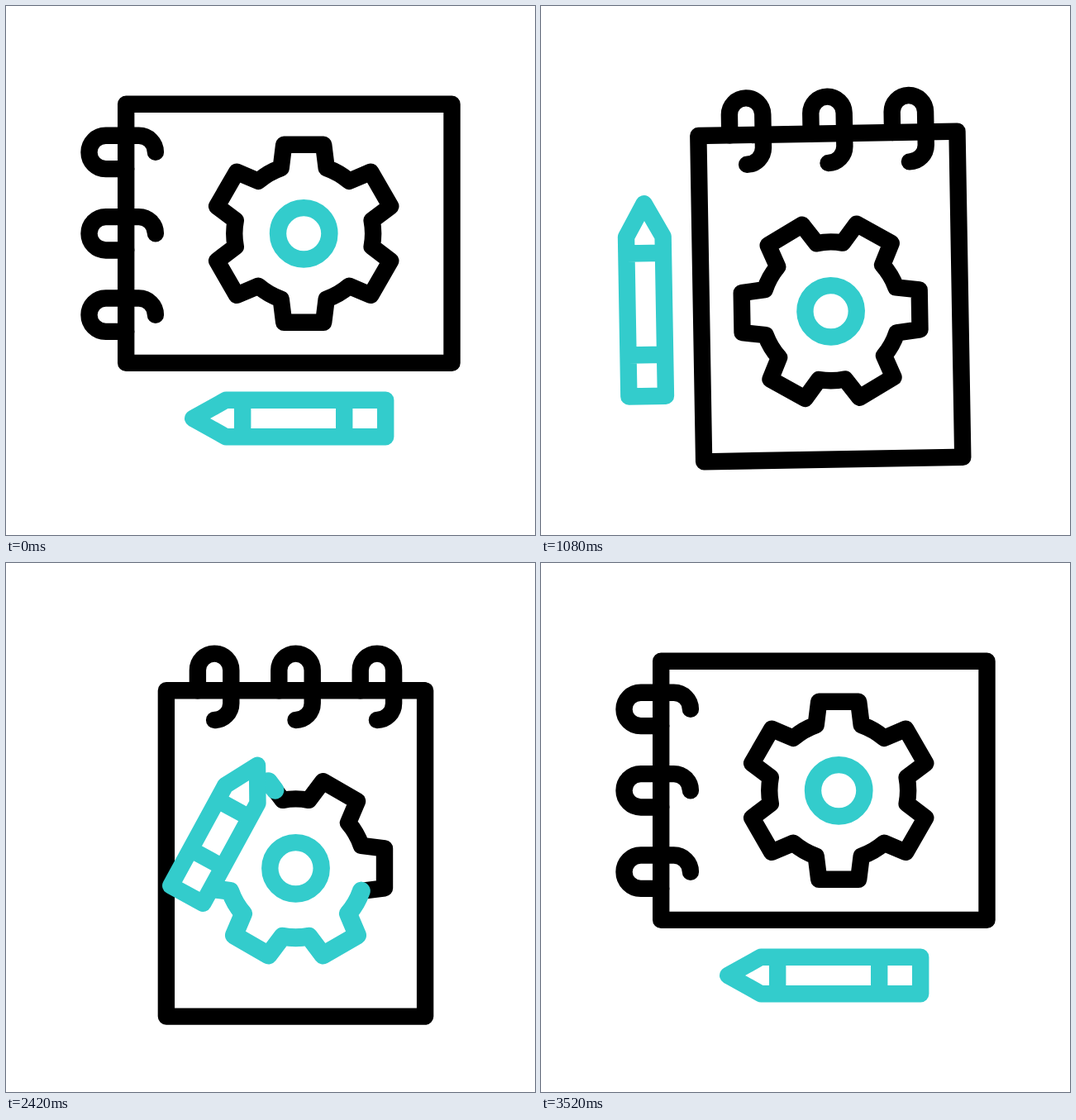
An HTML page that plays this animation: 640 px wide and 640 px high, repeating every 3580 ms.

```html
<!DOCTYPE html>
<html lang="en">
<head>
<meta charset="utf-8">
<title>Sketchbook</title>
<style>
  html, body { margin: 0; height: 100%; overflow: hidden; background: #fff; }
  svg { display: block; width: 100vw; height: 100vh; }
  path, circle { fill: none; stroke: #000; stroke-width: 20.4; stroke-linecap: round; stroke-linejoin: round; }
  .accent { stroke: #3cc; }
  #trail { stroke-width: 22; }
  #pen { fill: #fff; }
</style>
</head>
<body>
<svg viewBox="0 0 640 640">
  <path id="swoosh" class="accent"/>
  <g id="book">
    <path d="M-215-156.6H179.3V156.6H-215Z"/>
    <path id="rings"/>
    <path id="gear"/>
    <circle class="accent" r="31.2"/>
    <path id="trail" class="accent"/>
    <path id="pen" class="accent"/>
  </g>
</svg>
<script>
const LOOP = 3580, REST = 3520;
const [swoosh, book, rings, gear, trail, pen] =
  ['swoosh', 'book', 'rings', 'gear', 'trail', 'pen'].map(id => document.getElementById(id));

const rad = deg => deg * Math.PI / 180;
const clamp = x => Math.min(1, Math.max(0, x));
const linear = (t, from, to) => clamp((t - from) / (to - from));
const ease = (t, from, to) => {
  const x = linear(t, from, to);
  return x * x * (3 - 2 * x);
};

const turn = (x, y, deg) => {
  const c = Math.cos(rad(deg)), s = Math.sin(rad(deg));
  return `${x * c - y * s} ${x * s + y * c}`;
};

function gearPath() {
  let d = 'M' + turn(27.5, -79.3, 0);
  for (let a = 60; a <= 360; a += 60) {
    d += 'A84 84 0 0 1 ' + turn(-27.5, -79.3, a);
    for (const [x, y] of [[-24, -107.5], [24, -107.5], [27.5, -79.3]]) d += 'L' + turn(x, y, a);
  }
  return d;
}

const outline = gearPath();
gear.setAttribute('d', outline);
trail.setAttribute('d', outline);
const length = gear.getTotalLength();

rings.setAttribute('d', [-98.4, 0, 98.4].map(y =>
  `M-215 ${y + 20.2}h-24.5a20.2 20.2 0 0 1 0-40.4h40a20.2 20.2 0 0 1 20.2 20.2`).join(''));

function drawBook(t) {
  const r = ease(t, 565, 1115) - ease(t, 2895, 3555);
  const x = 360.2 - 9.7 * r;
  const y = 275.3 - 43 * ease(t, 215, 571) + 137 * ease(t, 571, 996) - 94 * ease(t, 2880, 3540);
  book.setAttribute('transform', `translate(${x} ${y}) rotate(${90 * r})`);
}

function drawTrail(t) {
  const start = ease(t, 3020, 3520) * length;
  const size = linear(t, 1430, 2960) * length - start;
  trail.style.display = size > 0.5 ? '' : 'none';
  trail.setAttribute('stroke-dasharray', `0 ${start} ${size} ${2 * length}`);
}

function drawPen(t) {
  const use = ease(t, 1100, 1430) - ease(t, 3038, 3520);
  const p = gear.getPointAtLength(linear(t, 1422, 3090) * length);
  const x = -134 + (p.x - 33 + 134) * use;
  const y = 223.7 + (p.y - 10 - 223.7) * use;
  const cut = 55 * use;
  pen.setAttribute('d', `M0 0L40-22.3H${233 - cut}V22.3H40ZM60-22.3V22.3M${183 - cut}-22.3V22.3`);
  pen.setAttribute('transform', `translate(${x} ${y}) rotate(${28.6 * use})`);
}

function drawSwoosh(t) {
  const [cx, cy, first, sweep, head, tail] = t < 2000
    ? [521, 438, -5.5, 120, ease(t, 750, 910), ease(t, 850, 1050)]
    : [512, 150, 13.4, -120, ease(t, 2870, 3120), ease(t, 3120, 3320)];
  swoosh.style.display = head - tail > 0.002 ? '' : 'none';
  const at = f => {
    const a = rad(first + sweep * f);
    return `${cx + 104 * Math.cos(a)} ${cy + 104 * Math.sin(a)}`;
  };
  swoosh.setAttribute('d', `M${at(tail)}A104 104 0 0 ${sweep > 0 ? 1 : 0} ${at(head)}`);
}

function frame() {
  let t = performance.now() % LOOP;
  if (t >= REST) t = 0;
  for (const draw of [drawBook, drawTrail, drawPen, drawSwoosh]) draw(t);
  requestAnimationFrame(frame);
}
frame();
</script>
</body>
</html>
```
